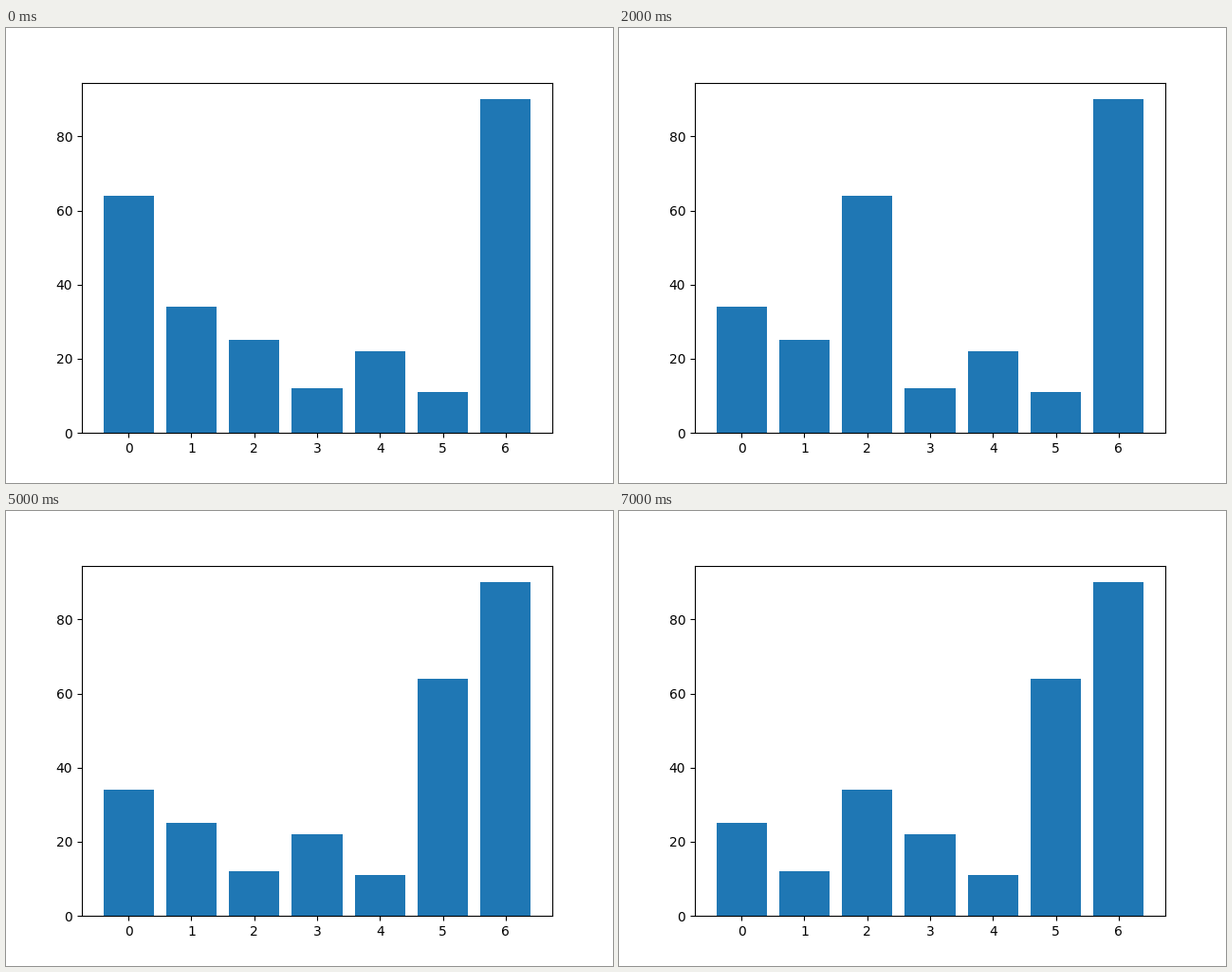
Animation, 640 px wide and 480 px high, one loop 8 s. Source, as a matplotlib script:

```python
import matplotlib.pyplot as plt
from matplotlib.animation import FuncAnimation

VALUES = [64, 34, 25, 12, 22, 11, 90]
FRAMES = 8
INTERVAL = 1000


def bubble_sort_states(values):
    """Yield the list before sorting and after each swap."""
    a = list(values)
    yield list(a)
    for end in range(len(a) - 1, 0, -1):
        for j in range(end):
            if a[j] > a[j + 1]:
                a[j], a[j + 1] = a[j + 1], a[j]
                yield list(a)


states = list(bubble_sort_states(VALUES))[:FRAMES]

fig, ax = plt.subplots(figsize=(6.4, 4.8), dpi=100)
bars = ax.bar(range(len(VALUES)), VALUES, color="#1f77b4")


def update(i):
    for bar, height in zip(bars, states[i]):
        bar.set_height(height)
    return list(bars)


anim = FuncAnimation(fig, update, frames=FRAMES, interval=INTERVAL,
                     repeat=True, blit=False)
plt.show()
```
